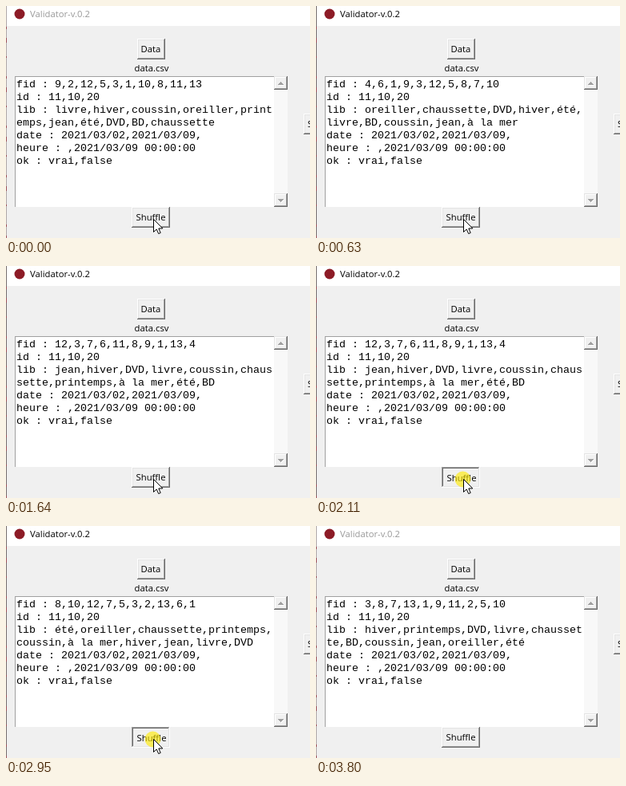
Write an HTML page that moves like this. It is 380x291 px and loops after 3950 ms.

```html
<!DOCTYPE html>
<html lang="fr">
<head>
<meta charset="utf-8">
<title>Validator</title>
<style>
html, body { margin: 0; width: 100%; height: 100%; overflow: hidden; background: #f0f0f0; }
svg { display: block; width: 380px; height: 291px; }
text { font: 11.3px "Open Sans", "Noto Sans", sans-serif; white-space: pre; }
#data text { font: 13.333px "Liberation Mono", monospace; }
.mid { text-anchor: middle; }
</style>
</head>
<body>
<svg viewBox="0 0 380 291">
  <rect width="380" height="291" fill="#f0f0f0"/>
  <rect width="380" height="25" fill="#fff"/>
  <circle cx="17" cy="10" r="6.5" fill="#8c1b26"/>
  <text id="title" x="30" y="14">Validator-v.0.2</text>
  <g shape-rendering="crispEdges">
    <path id="edge" d="M.5 0V291"/>
    <path d="M.5 26V291" stroke="#a0525a" stroke-dasharray="3 11 6 17 2 23"/>
  </g>

  <g id="open"></g>
  <text class="mid" x="181" y="58">Data</text>
  <text class="mid" x="182" y="82">data.csv</text>
  <g id="side"></g>
  <text x="377" y="152">S</text>

  <g shape-rendering="crispEdges">
    <rect x="11" y="88" width="324" height="164" fill="#fff"/>
    <path d="M11.5 252V88.5H335" fill="none" stroke="#a0a0a0"/>
    <rect x="335" y="88" width="17" height="164" fill="#f8f8f8"/>
  </g>
  <g id="up"></g>
  <g id="down"></g>
  <g shape-rendering="crispEdges">
    <path d="M341 100h7l-3.5-4zM341 243h7l-3.5 4z" fill="#fff"/>
    <path d="M340 99h7l-3.5-4zM340 242h7l-3.5 4z" fill="#a0a0a0"/>
  </g>
  <g id="data"></g>

  <g id="raised"></g>
  <g id="sunken"></g>
  <text id="label" class="mid" x="181" y="269">Shuffle</text>
  <circle id="glow" cx="183.5" cy="267.5" r="10" fill="#ffea00" fill-opacity=".62"/>
  <path id="cursor" d="M.5 .5V16.5L4.2 13L6.7 18.6L9.2 17.5L6.8 12H11.8Z" fill="#fff" stroke="#000"/>
</svg>
<script>
const LOOP = 3950, COLS = 40;
const $ = id => document.getElementById(id);

// Shuffled values: fid list, lib list
const rows = [
  ['9,2,12,5,3,1,10,8,11,13', 'livre,hiver,coussin,oreiller,printemps,jean,été,DVD,BD,chaussette'],
  ['7,2,13,4,10,1,6,3,9,12', 'jean,livre,printemps,BD,oreiller,hiver,à la mer,DVD,chaussette,été'],
  ['4,6,1,9,3,12,5,8,7,10', 'oreiller,chaussette,DVD,hiver,été,livre,BD,coussin,jean,à la mer'],
  ['5,9,1,2,13,4,12,11,8,3', 'chaussette,oreiller,hiver,été,BD,printemps,DVD,à la mer,livre,coussin'],
  ['12,3,7,6,11,8,9,1,13,4', 'jean,hiver,DVD,livre,coussin,chaussette,printemps,à la mer,été,BD'],
  ['6,9,12,1,7,4,5,2,10,8', 'BD,hiver,été,à la mer,chaussette,coussin,oreiller,DVD,livre,jean'],
  ['8,10,12,7,5,3,2,13,6,1', 'été,oreiller,chaussette,printemps,coussin,à la mer,hiver,jean,livre,DVD'],
  ['3,8,7,13,1,9,11,2,5,10', 'hiver,printemps,DVD,livre,chaussette,BD,coussin,jean,oreiller,été']
];

const HOME = [184, 267], LEAVING = [182, 281];
// time, row, window active, button pressed, cursor position
const steps = [
  [0, 0, 0, 0, HOME],
  [80, 0, 1, 1, HOME],
  [170, 1, 1, 0, HOME],
  [630, 2, 1, 0, HOME],
  [1090, 2, 1, 1, HOME],
  [1160, 3, 1, 0, HOME],
  [1640, 4, 1, 0, HOME],
  [2110, 4, 1, 1, HOME],
  [2340, 5, 1, 0, HOME],
  [2490, 5, 1, 1, HOME],
  [2720, 6, 1, 0, HOME],
  [2950, 6, 1, 1, HOME],
  [3110, 7, 1, 0, HOME],
  [3190, 7, 1, 0, LEAVING],
  [3260, 7, 1, 0, null],
  [3800, 7, 0, 0, null]
];

// Edge colours, outer then inner: top-left pair, bottom-right pair
const RAISED = [['#fff', '#e3e3e3'], ['#696969', '#a0a0a0']];
const SUNKEN = [['#a0a0a0', '#696969'], ['#fff', '#e3e3e3']];
const SCROLL = [['#e3e3e3', '#fff'], ['#696969', '#a0a0a0']];

function bevel(id, x, y, w, h, [tl, br]) {
  const r = x + w - 1, b = y + h - 1;
  let out = `<rect x="${x}" y="${y}" width="${w}" height="${h}" fill="#f0f0f0"/>`;
  for (const i of [0, 1]) {
    const k = i + .5;
    out += `<path d="M${x + k} ${b - i}V${y + k}H${r - i}" stroke="${tl[i]}" fill="none"/>` +
           `<path d="M${x + i} ${b + .5 - i}H${r + .5 - i}V${y + i}" stroke="${br[i]}" fill="none"/>`;
  }
  $(id).setAttribute('shape-rendering', 'crispEdges');
  $(id).innerHTML = out;
}

function listing([fid, lib]) {
  return [
    'fid : ' + fid,
    'id : 11,10,20',
    'lib : ' + lib,
    'date : 2021/03/02,2021/03/09,',
    'heure : ,2021/03/09 00:00:00',
    'ok : vrai,false'
  ].flatMap(s => s.match(new RegExp(`.{1,${COLS}}`, 'g')))
   .map((s, i) => `<text x="13" y="${102 + 16 * i}">${s}</text>`).join('');
}

bevel('open', 164, 41, 35, 26, RAISED);
bevel('side', 372, 135, 40, 26, RAISED);
bevel('up', 335, 88, 17, 17, SCROLL);
bevel('down', 335, 235, 17, 17, SCROLL);
bevel('raised', 157, 252, 48, 26, RAISED);
bevel('sunken', 157, 252, 48, 26, SUNKEN);

const show = (id, on) => $(id).setAttribute('visibility', on ? 'visible' : 'hidden');
let current;

function render(step) {
  const [, row, active, pressed, pos] = step;
  $('data').innerHTML = listing(rows[row]);
  $('title').setAttribute('fill', active ? '#000' : '#999');
  $('edge').setAttribute('stroke', active ? '#77706f' : '#b0a8a8');
  show('raised', !pressed);
  show('sunken', pressed);
  show('glow', pressed);
  $('label').setAttribute('transform', pressed ? 'translate(1 1)' : '');
  show('cursor', pos);
  if (pos) $('cursor').setAttribute('transform', `translate(${pos})`);
}

const start = performance.now();
function tick() {
  const t = (performance.now() - start) % LOOP;
  const step = steps.findLast(s => s[0] <= t);
  if (step !== current) render(current = step);
  requestAnimationFrame(tick);
}
tick();
</script>
</body>
</html>
```
